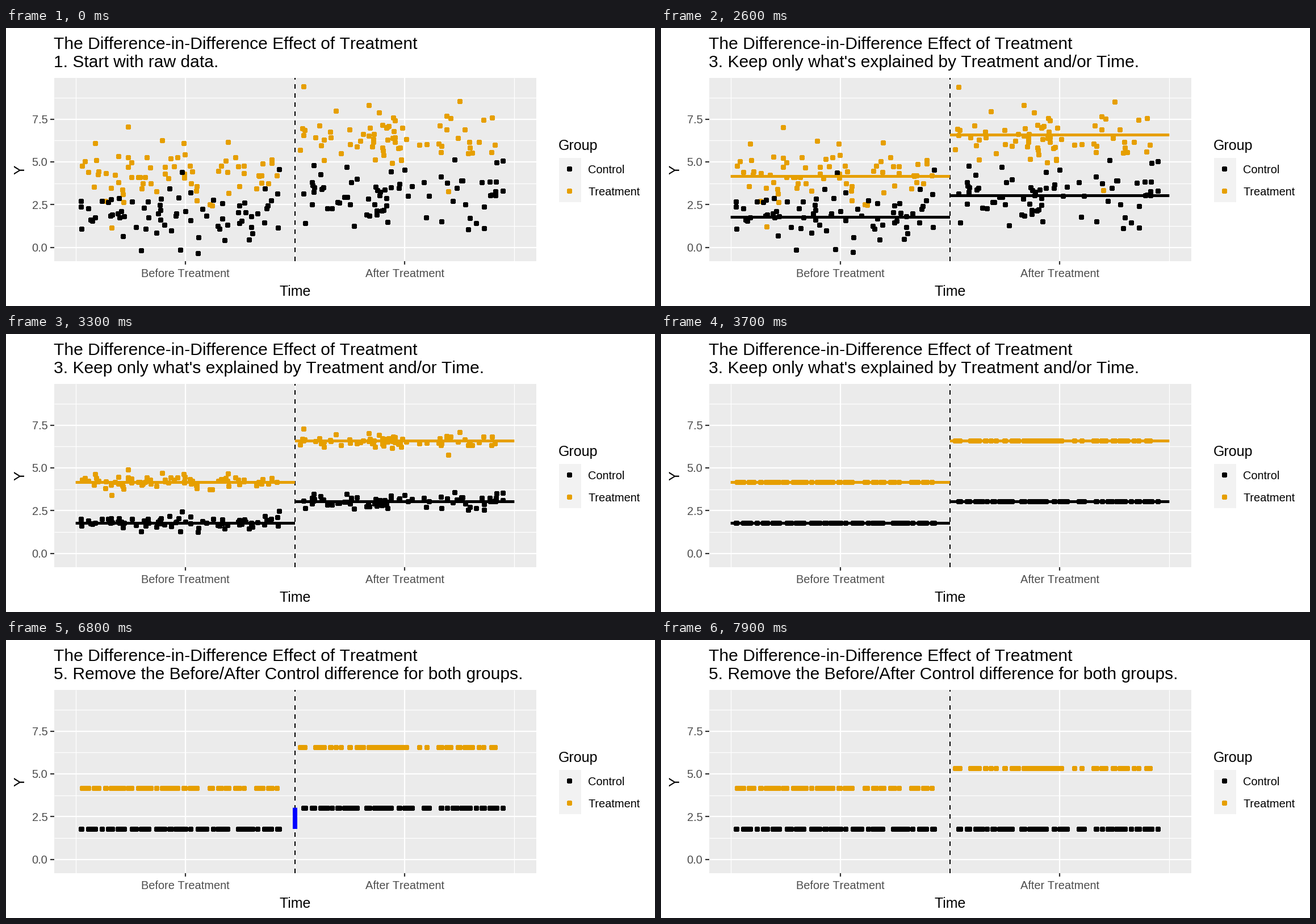
A matplotlib script for the animation above (8000 ms loop, 1143 by 490 pixels).

```python
import math

import matplotlib.pyplot as plt
import numpy as np
from matplotlib.animation import FuncAnimation
from matplotlib.patches import Rectangle

WIDTH, HEIGHT, DPI = 1143, 490, 64
PT = 72 / DPI
FRAMES, INTERVAL = 80, 100
BLACK, ORANGE, BLUE = "#000000", "#E69F00", "#0000FF"
LEFT, RIGHT, TOP, BOTTOM = 84.5, 934, 88, 411
SPLIT, PERIOD_WIDTH = 509, 386.3
ZERO_Y, UNIT = 386.6, 30.14
POINTS_PER_CLUSTER, SPREAD, MAX_OFFSET = 72, 25, 58

plt.rcParams["font.family"] = "Liberation Sans"
plt.rcParams["text.kerning_factor"] = 6
rng = np.random.default_rng(5)

HEADING = "The Difference-in-Difference Effect of Treatment"
STEPS = [
    (0, "1. Start with raw data."),
    (5, "2. Figure out what differences in Y are explained by Treatment and/or Time."),
    (26, "3. Keep only what's explained by Treatment and/or Time."),
    (47, "4. See how Control changed over Time."),
    (68, "5. Remove the Before/After Control difference for both groups."),
]
LINES_ON, LINES_OFF, GAP_ON = 9, 47, 51
COLLAPSE_START, SHIFT_START, MOVE_FRAMES = 25, 67, 12

# Color, mean height, after treatment?, most visible outliers
CLUSTERS = [
    (BLACK, 333.5, False, [(238, 392), (338, 397), (310, 254), (481, 249)]),
    (BLACK, 295.5, True, [(600, 245), (790, 232), (814, 355), (875, 234)]),
    (ORANGE, 261.5, False, [(215, 174), (275, 198), (391, 201), (186, 352)]),
    (ORANGE, 188.5, True, [(524, 103), (639, 136), (799, 129), (779, 288)]),
]
GAP_BOTTOM, GAP_TOP = 333, 295
RISE = GAP_BOTTOM - GAP_TOP


def ease(frame, start):
    """Sine ease in and out, from 0 to 1."""
    p = min(max((frame - start) / MOVE_FRAMES, 0), 1)
    return (1 - math.cos(math.pi * p)) / 2


def scatter_cluster(color, mean, after, outliers):
    """Rows of x, y, mean, after and color for one group in one period."""
    start = 518 if after else 132
    count = POINTS_PER_CLUSTER - len(outliers)
    offsets = np.clip(rng.normal(0, SPREAD, count), -MAX_OFFSET, MAX_OFFSET)
    xs = [*rng.uniform(start, start + 364 - 14 * (not after), count)]
    ys = [*(mean + offsets)]
    for x, y in outliers:
        xs.append(x)
        ys.append(y)
    return [(x, y, mean, after, color) for x, y in zip(xs, ys)]


points = [row for cluster in CLUSTERS for row in scatter_cluster(*cluster)]
rng.shuffle(points)
*columns, colors = zip(*points)
xs, ys, centers, is_after = (np.array(c, dtype=float) for c in columns)

fig = plt.figure(figsize=(WIDTH / DPI, HEIGHT / DPI), dpi=DPI, facecolor="white")
ax = fig.add_axes([0, 0, 1, 1])
ax.set_xlim(0, WIDTH)
ax.set_ylim(HEIGHT, 0)
ax.axis("off")


def line(x, y, color, width, z, **style):
    return ax.plot(x, y, color=color, lw=width * PT, zorder=z,
                   solid_capstyle="butt", **style)[0]


def label(x, y, text, size, color="black", ha="left", **style):
    return ax.text(x, y, text, fontsize=size * PT, color=color, ha=ha,
                   va="baseline", zorder=10, **style)


def box(x, y, w, h, color):
    ax.add_patch(Rectangle((x, y), w, h, facecolor=color, edgecolor="none", zorder=0))


def pixel_centers(x, y):
    return np.floor(np.column_stack([x, y])) + 0.5


def dots(x, y, color):
    """Hard-edged dots, nine pixels across."""
    cx, cy = pixel_centers(x, y).T
    return ax.scatter(cx, cy, s=(9 * PT) ** 2, c=color, linewidths=0,
                      antialiased=False, zorder=4)


# Panel, grid and axes
box(LEFT, TOP, RIGHT - LEFT, BOTTOM - TOP, "#EBEBEB")
for i in range(4):
    y = ZERO_Y - UNIT * (2.5 * i + 1.25)
    line([LEFT, RIGHT], [y, y], "white", 1.2, 1)
for i in (-1, 0, 1):
    x = SPLIT + PERIOD_WIDTH * i
    line([x, x], [TOP, BOTTOM], "white", 1.2, 1)
for i in range(4):
    y = ZERO_Y - UNIT * 2.5 * i
    line([LEFT, RIGHT], [y, y], "white", 2.2, 2)
    line([LEFT - 6.2, LEFT], [y, y], "#333333", 2.2, 2)
    label(73.5, y + 7.5, f"{2.5 * i:.1f}", 20, "#4D4D4D", "right")
for side, name in ((-1, "Before Treatment"), (1, "After Treatment")):
    x = SPLIT + side * PERIOD_WIDTH / 2
    line([x, x], [TOP, BOTTOM], "white", 2.2, 2)
    line([x, x], [BOTTOM, BOTTOM + 6.2], "#333333", 2.2, 2)
    label(x, 439, name, 20, "#4D4D4D", "center")
label(SPLIT + 0.3, 472, "Time", 25, ha="center")
label(32.5, 249.7, "Y", 25, ha="center", rotation=90, rotation_mode="anchor")

# Legend
label(973, 215, "Group", 25)
box(973.5, 229, 39, 78, "#F2F2F2")
dots([992, 992], [248, 287], [BLACK, ORANGE])
for y, name in ((256, "Control"), (295, "Treatment")):
    label(1025, y, name, 20)

# Moving parts
label(84.5, 36.8, HEADING, 30)
subtitle = label(84.5, 69, "", 30)
cloud = dots(xs, ys, colors)
line([SPLIT, SPLIT], [BOTTOM, TOP], "black", 2, 5, snap=False,
     dashes=(4, 4), dash_capstyle="butt")
means = []
for color, mean, after, _ in CLUSTERS:
    start = SPLIT if after else SPLIT - PERIOD_WIDTH
    means.append(line([start, start + PERIOD_WIDTH], [mean, mean], color, 5, 6,
                      snap=False))
gap = line([SPLIT, SPLIT], [GAP_BOTTOM, GAP_TOP], BLUE, 8, 7, snap=False)


def update(frame):
    collapse = ease(frame, COLLAPSE_START)
    shift = RISE * ease(frame, SHIFT_START)
    subtitle.set_text([text for start, text in STEPS if frame >= start][-1])
    heights = ys + (centers - ys) * collapse + is_after * shift
    cloud.set_offsets(pixel_centers(xs, heights))
    for mean in means:
        mean.set_visible(LINES_ON <= frame < LINES_OFF)
    gap.set_ydata([GAP_BOTTOM, GAP_TOP + shift])
    gap.set_visible(frame >= GAP_ON and shift < RISE)
    return [subtitle, cloud, gap, *means]


animation = FuncAnimation(fig, update, frames=FRAMES, interval=INTERVAL,
                          repeat=True, repeat_delay=0)
plt.show()
```
